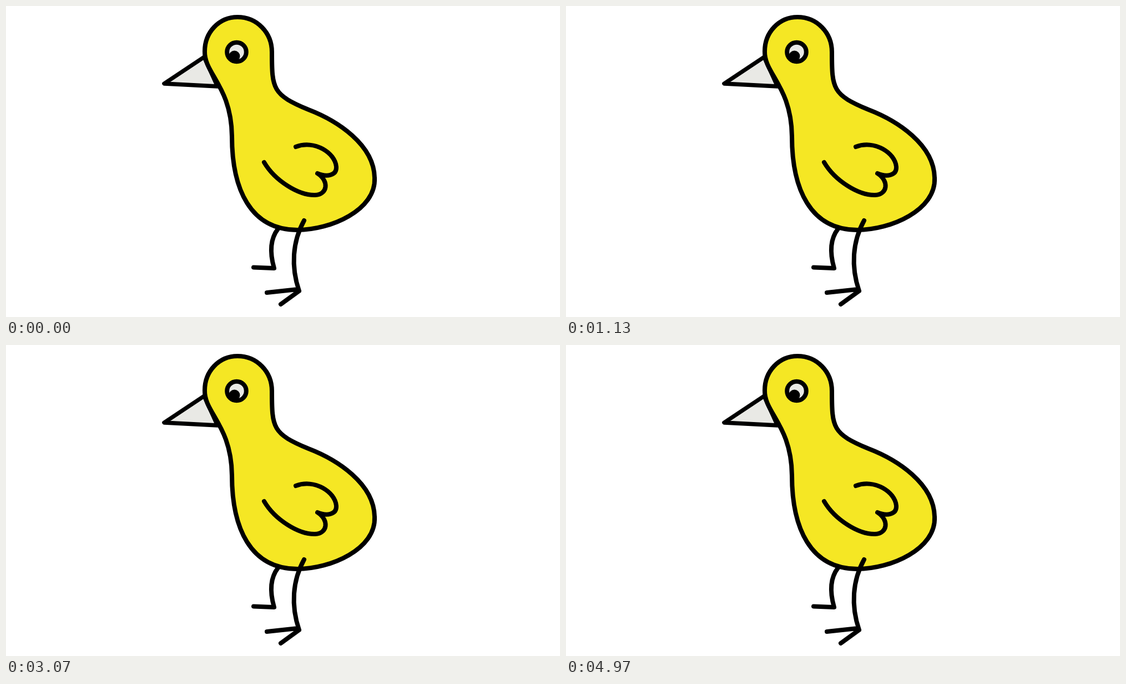
Recreate the animation shown at these times as an HTML page with a canvas. Size 998 by 561 pixels, loop 5730 ms.

```html
<!DOCTYPE html>
<html>
<head>
<meta charset="utf-8">
<style>
html, body { margin: 0; width: 100%; height: 100%; overflow: hidden; background: #fff; }
canvas { display: block; }
</style>
</head>
<body>
<canvas id="stage" width="998" height="561"></canvas>
<script>
const ctx = document.getElementById('stage').getContext('2d');
const LOOP = 5730, START = 200, PERIOD = 1930, STEP = 39.5;
const YELLOW = '#f5e724', PALE = '#e9e9e5', BLACK = '#000';

// Each part swings about its pivot and turns about its own centre (degrees).
const HEAD = { pivot: [573, 300], centre: [418, 81], swing: 67, turn: 69 };
const RUMP = { pivot: [552, 300], centre: [552, 300], swing: 0, turn: 72 };

const BEAK = new Path2D('M357 92L285 140L381 145Z');
const WING = new Path2D('M522 254C556 241 593 265 595 290C596 306 578 309 561 302' +
  'C583 316 579 340 557 341C528 342 485 316 465 282');
const BACK_LEG = new Path2D('M490 402C476 420 475 445 483 473L446 471.5');
const FRONT_LEG = new Path2D('M537 387C516 425 513 470 528 514M470 517L521 511.5L528 514L495 538');

// Down, a small lift, down again, then up; eight steps for each part.
function peck(step) {
  const wave = Math.cos(Math.PI * step / 8);
  if (step < 8) return (1 - wave) / 2;
  if (step < 16) return 0.89 + 0.11 * Math.cos(Math.PI * step / 4);
  return (1 + wave) / 2;
}

function poseAt(t) {
  if (t < START) return 0;
  const step = 1 + Math.floor((t - START) % PERIOD / STEP);
  return peck(Math.min(step, 24));
}

// Parts grow slightly taller and narrower as the bird bends down.
function place({ pivot: [px, py], centre: [cx, cy], swing, turn }, p) {
  const at = new DOMMatrix().translate(px, py).rotate(-swing * p)
    .transformPoint({ x: cx - px, y: cy - py });
  return new DOMMatrix().translate(at.x, at.y).scale(1 - 0.05 * p, 1 + 0.05 * p)
    .rotate(-turn * p).translate(-cx, -cy);
}

function mapper(matrix) {
  return (x, y) => {
    const q = matrix.transformPoint({ x, y });
    return [q.x, q.y];
  };
}

// One outline whose points follow the head (h) or the rump (r).
function bodyPath(h, r) {
  const path = new Path2D();
  const curve = (a, b, c) => path.bezierCurveTo(...a, ...b, ...c);
  path.moveTo(...h(479, 83));
  curve(h(479, 48), h(452, 20), h(417, 20));
  curve(h(384, 20), h(358, 47), h(358, 82));
  curve(h(357, 122), r(406, 145), r(407, 235));
  curve(r(407, 330), r(440, 404), r(525, 404));
  curve(r(585, 404), r(667, 368), r(664, 310));
  curve(r(663, 250), r(597, 207), r(545, 187));
  curve(r(480, 160), h(479, 150), h(479, 83));
  path.closePath();
  return path;
}

function circle(x, y, r) {
  const path = new Path2D();
  path.arc(x, y, r, 0, 2 * Math.PI);
  return path;
}

function shape(path, fill, width, matrix = new DOMMatrix()) {
  ctx.setTransform(matrix);
  if (fill) {
    ctx.fillStyle = fill;
    ctx.fill(path);
  }
  if (width) {
    ctx.lineWidth = width;
    ctx.stroke(path);
  }
}

function draw(p) {
  const head = place(HEAD, p), rump = place(RUMP, p);
  ctx.resetTransform();
  ctx.clearRect(0, 0, 998, 561);
  ctx.strokeStyle = BLACK;
  ctx.lineCap = ctx.lineJoin = 'round';

  shape(BACK_LEG, null, 8);
  shape(BEAK, PALE, 7.5, head);
  shape(bodyPath(mapper(head), mapper(rump)), YELLOW, 8);
  shape(circle(415.5, 83, 17.3), PALE, 8, head);
  shape(circle(411.5, 90.5, 10), BLACK, 0, head);
  shape(WING, null, 8, rump);
  shape(FRONT_LEG, null, 8);
}

const begin = performance.now();
function frame() {
  draw(poseAt((performance.now() - begin + 1) % LOOP));
  requestAnimationFrame(frame);
}
frame();
</script>
</body>
</html>
```
